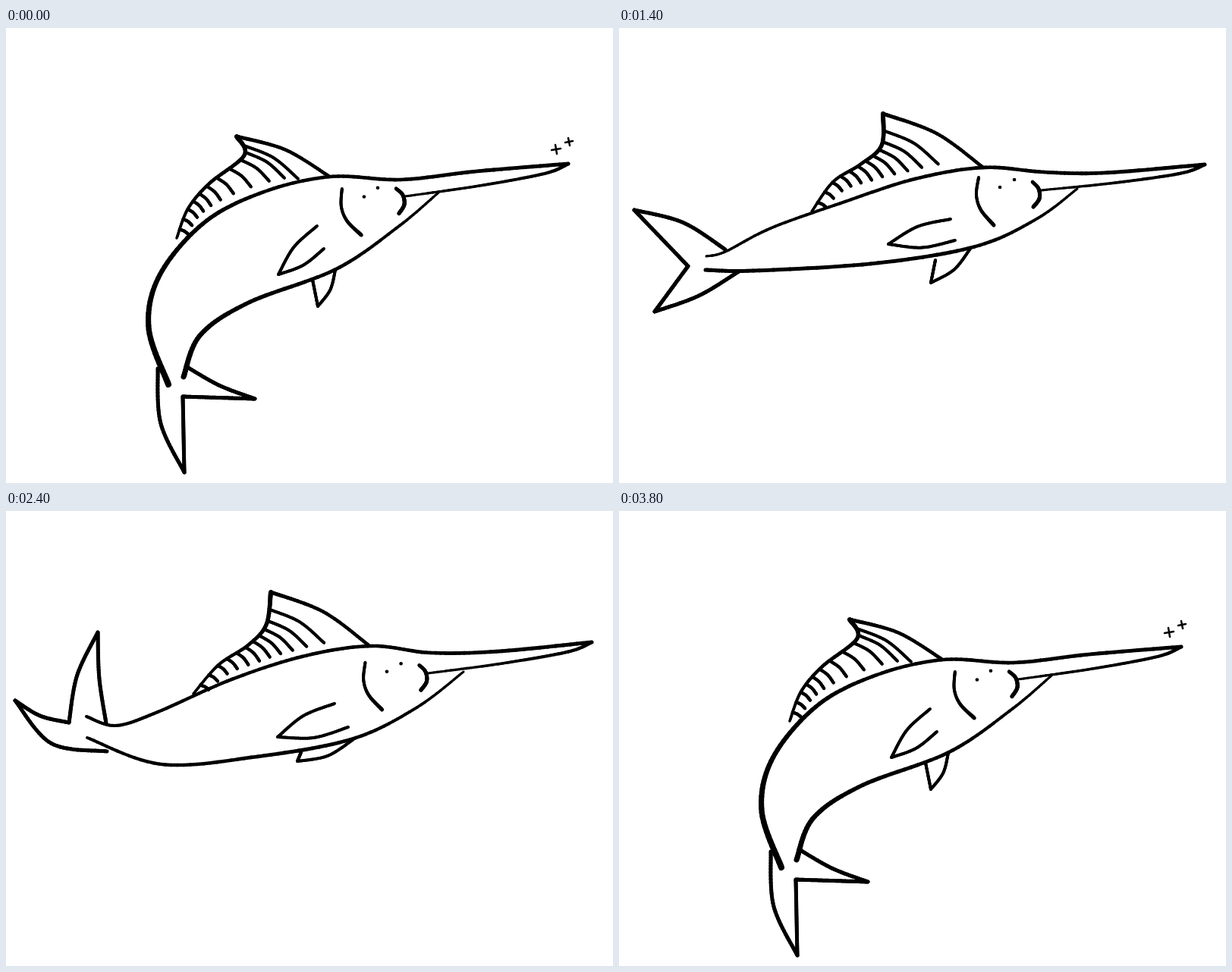
Recreate the animation shown at these times as an HTML page with a canvas. Size 800 px wide and 600 px high, loop 4 s.

```html
<!DOCTYPE html>
<html>
<head>
<meta charset="utf-8">
<title>Leaping swordfish</title>
<style>
html, body { margin: 0; width: 100%; height: 100%; overflow: hidden; background: #fff; }
canvas { display: block; }
</style>
</head>
<body>
<canvas id="stage" width="800" height="600"></canvas>
<script>
const ctx = document.getElementById('stage').getContext('2d');

// Points are flat x, y lists. Tail: root, tip, notch, tip, root.
// Fin: front end, top, then down the rear edge. Head: shift and turn.
const jump = {
  back: [741, 179, 620, 189, 520, 200, 428, 196, 340, 216, 262, 256, 203, 325, 188, 395, 214, 470],
  belly: [570, 217, 517, 262, 435, 318, 320, 362, 256, 405, 234, 460],
  tail: [200, 449, 235, 586, 233, 486, 328, 489, 237, 446],
  bows: [-.1, 0, 0, .04],
  fin: [425, 195, 304, 143, 314, 168, 268, 205, 240, 238, 225, 277],
  pectoral: [410, 261, 359, 325, 419, 291],
  pelvic: [404, 332, 411, 367, 434, 319],
  head: [-30, 8, -5], rear: [8, 7],
  sparks: [[725, 160, 6], [742, 150, 5]]
};
const rise = {
  back: [776, 185, 610, 191, 540, 187, 460, 182, 390, 189, 300, 224, 235, 282, 209, 350, 211, 412],
  belly: [600, 209, 545, 250, 455, 302, 350, 330, 275, 373, 228, 422],
  tail: [208, 399, 173, 537, 229, 450, 279, 500, 240, 407],
  fin: [459, 181, 346, 121, 350, 158, 318, 182, 283, 209, 261, 250],
  pectoral: [438, 247, 376, 282, 439, 284],
  pelvic: [418, 313, 411, 341, 452, 304],
  head: [3, -1, 0], rear: [6, 4]
};
const level = {
  back: [775, 185, 640, 191, 570, 193, 467, 180, 385, 191, 295, 231, 225, 277, 170, 318, 138, 328],
  belly: [602, 213, 545, 249, 465, 297, 350, 333, 230, 350, 140, 354],
  tail: [160, 321, 42, 272, 112, 338, 63, 410, 168, 355],
  fin: [467, 179, 353, 110, 345, 156, 318, 178, 281, 206, 252, 256],
  pectoral: [434, 250, 356, 267, 430, 284],
  pelvic: [411, 316, 407, 330, 467, 297],
  head: [1, -2, 0], rear: [3, 6],
  sparks: [[741, 166, 7]]
};
const glide = {
  back: [772, 180, 640, 191, 560, 190, 480, 184, 390, 199, 295, 230, 200, 264, 140, 295, 115, 301],
  belly: [604, 212, 550, 252, 470, 288, 340, 310, 180, 320, 114, 319],
  tail: [140, 292, 20, 240, 91, 314, 47, 374, 158, 321],
  fin: [480, 184, 348, 113, 346, 155, 318, 180, 282, 203, 254, 242],
  pectoral: [437, 252, 355, 285, 443, 280],
  pelvic: [417, 306, 411, 336, 463, 291],
  head: [0, 0, 0], rear: [3, 5]
};
const tailUp = {
  back: [772, 173, 650, 185, 560, 187, 480, 178, 390, 192, 295, 223, 200, 265, 145, 283, 106, 271],
  belly: [603, 212, 540, 260, 455, 301, 330, 324, 205, 334, 107, 299],
  tail: [132, 280, 121, 160, 83, 279, 12, 250, 133, 317],
  bows: [.03, -.07, .08, -.19],
  fin: [478, 177, 349, 107, 343, 150, 319, 177, 280, 203, 247, 241],
  pectoral: [433, 254, 358, 298, 451, 285],
  pelvic: [389, 318, 384, 330, 458, 301],
  head: [0, 0, -2], rear: [4, 4]
};

const mouth = [545, 203, 553, 212, 554, 225, 546, 236];
const gill = [474, 197, 471, 220, 477, 240, 494, 260];
const eyes = [502, 210, 521, 200];

const mapPoints = (pts, f) =>
  pts.flatMap((x, i) => i % 2 ? [] : f(x, pts[i + 1]));

function turnPoint(x, y, cx, cy, degrees) {
  const a = degrees * Math.PI / 180, c = Math.cos(a), s = Math.sin(a);
  return [cx + (x - cx) * c - (y - cy) * s, cy + (x - cx) * s + (y - cy) * c];
}

// Halfway between two poses.
const between = (a, b) => Object.fromEntries(['back', 'belly', 'fin', 'pectoral', 'pelvic', 'head', 'rear']
  .map(name => [name, a[name].map((v, i) => (v + b[name][i]) / 2)]));

// Curls the rear of the body and the tail upwards.
function curl(fish, degrees) {
  const bend = pts => mapPoints(pts, (x, y) =>
    turnPoint(x, y, 215, 295, degrees * Math.min(1, Math.max(0, (240 - x) / 120))));
  return { ...fish, back: bend(fish.back), belly: bend(fish.belly), tail: bend(fish.tail) };
}

const turn = { ...between(rise, level), tail: [172, 358, 62, 396, 133, 415, 148, 511, 197, 388] };

const half = [jump, rise, turn, level, glide, tailUp, curl(tailUp, 25), tailUp];
const steps = [...half, curl(tailUp, 30), ...half.slice().reverse()];
const stay = i => i === 0 || i === 3 ? 500 : 200;

function line(x0, y0, x1, y1, width) {
  ctx.lineWidth = width;
  ctx.beginPath();
  ctx.moveTo(x0, y0);
  ctx.lineTo(x1, y1);
  ctx.stroke();
}

// Point on the smooth curve through pts; u runs from 0 to 1.
function onCurve(pts, u) {
  const last = pts.length / 2 - 1;
  const i = Math.min(last - 1, Math.floor(u * last)), t = u * last - i;
  return [0, 1].map(axis => {
    const [a, b, c, d] = [i - 1, i, i + 1, i + 2]
      .map(k => pts[2 * Math.min(last, Math.max(0, k)) + axis]);
    return b + t / 2 * (c - a + t * (2 * a - 5 * b + 4 * c - d + t * (3 * (b - c) + d - a)));
  });
}

// Pen line with start, middle and end width.
function ink(pts, w0, w1 = w0, w2 = w1) {
  const n = pts.length * 6;
  let prev = onCurve(pts, 0);
  for (let i = 1; i <= n; i++) {
    const u = i / n, next = onCurve(pts, u);
    line(...prev, ...next, u < .5 ? w0 + (w1 - w0) * 2 * u : w1 + (w2 - w1) * (2 * u - 1));
    prev = next;
  }
}

// Curve between two points; mid lists how far along and how far aside it passes.
function arc([x0, y0, x1, y1], mid, ...widths) {
  const dx = x1 - x0, dy = y1 - y0;
  const bent = mapPoints(mid, (u, v) => [x0 + u * dx + v * dy, y0 + u * dy - v * dx]);
  ink([x0, y0, ...bent, x1, y1], ...widths);
}

// One arc for each pair of neighbouring points.
const arcs = (pts, bows, ...widths) => bows.forEach((bow, i) =>
  arc(pts.slice(2 * i, 2 * i + 4), [.5, bow], ...widths));

function drawFin(fin) {
  const edge = fin.slice(2);
  arc([fin[2], fin[3], fin[0], fin[1]], [.5, .07], 5, 4.5);
  ink(edge, 6, 4.5, 3.5);
  for (let i = 0; i < 11; i++) {
    const u = i / 10, [x, y] = onCurve(edge, .14 + .77 * u);
    const dx = 10 + 62 * Math.exp(-4 * u);
    const dy = 30 - 24 * u + 14 * Math.exp(-8 * u);
    arc([x, y, x + dx, y + dy], [.5, .08], 4);
  }
}

function drawHead(fish) {
  const [dx, dy, angle] = fish.head;
  const place = pts => mapPoints(pts, (x, y) => turnPoint(x + dx, y + dy, 553 + dx, 214 + dy, angle));
  arc([...fish.back.slice(0, 2), 556 + dx, 214 + dy], [.15, .03, .55, .025], 4.5, 4, 3);
  ink(place(mouth), 4.5, 5);
  ink(place(gill), 4, 4, 5);
  mapPoints(place(eyes), (x, y) => { line(x, y, x + .1, y, 4.5); return []; });
}

function spark([x, y, r]) {
  line(x - r, y + 1, x + r, y - 1, 2.5);
  line(x - 1, y - r, x + 1, y + r, 2.5);
}

function draw(fish) {
  const { back, belly, tail, bows = [-.08, 0, 0, -.05], rear, sparks = [] } = fish;
  ctx.fillStyle = '#fff';
  ctx.fillRect(0, 0, 800, 600);
  ctx.strokeStyle = '#000';
  ctx.lineCap = 'round';
  ink(back, 5, 4.5, rear[0]);
  ink(belly, 3, 5, rear[1]);
  arcs(tail, bows, 5);
  arcs(fish.pectoral, [-.08, -.08], 4);
  arcs(fish.pelvic, [0, -.1], 4);
  drawFin(fish.fin);
  drawHead(fish);
  sparks.forEach(spark);
}

function tick() {
  let t = performance.now() % 4000, i = 0;
  while (i < steps.length - 1 && t >= stay(i)) t -= stay(i++);
  draw(steps[i]);
  requestAnimationFrame(tick);
}
tick();
</script>
</body>
</html>
```
